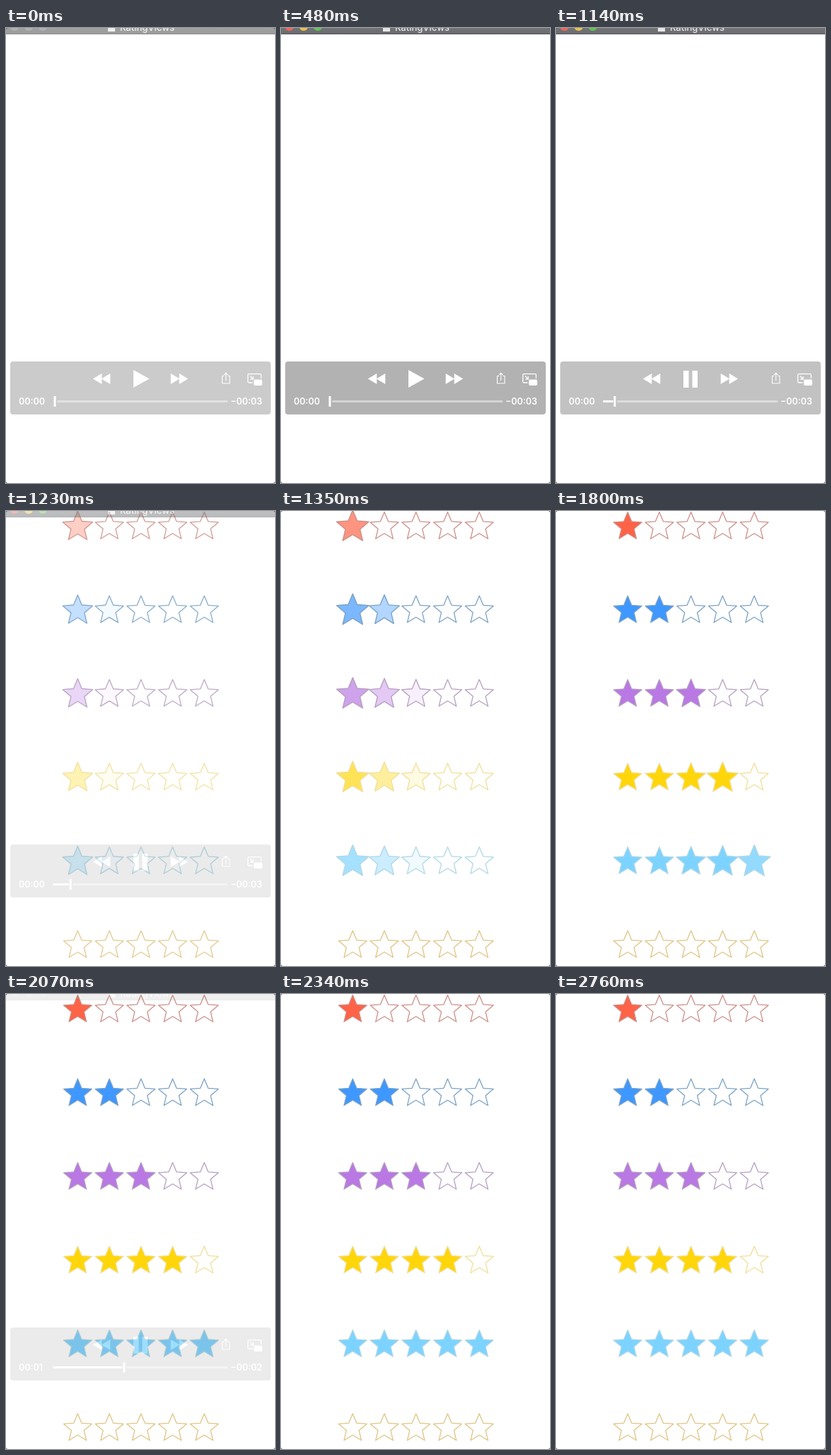
An HTML page with a canvas for the animation above (2.79 s loop, 380 by 644 pixels).

```html
<!DOCTYPE html>
<html lang="en">
<head>
<meta charset="utf-8">
<title>Star ratings</title>
<style>
  html, body { margin: 0; width: 100%; height: 100%; overflow: hidden; background: #fff; }
  canvas { display: block; }
</style>
</head>
<body>
<canvas id="stage" width="380" height="644"></canvas>
<script>
const W = 380, H = 644, LOOP = 2790, STEP = 30;
const stage = document.getElementById('stage').getContext('2d');
const layer = document.createElement('canvas');
layer.width = W;
layer.height = H;
const ui = layer.getContext('2d');

const ROWS = [
  { fill: '#ff6347', line: '#cc9088', rating: 1 },
  { fill: '#3f98ff', line: '#7ba3c6', rating: 2 },
  { fill: '#b978e4', line: '#b5a0c0', rating: 3 },
  { fill: '#ffd60a', line: '#f0df98', rating: 4 },
  { fill: '#7dd3ff', line: '#b0d8e6', rating: 5 },
  { fill: '#ffffff', line: '#dfc484', rating: 0 }
];
const LIGHTS = [[240, 102, 91], [232, 195, 75], [98, 197, 84]];
const PLAY_START = 985, STARS_START = 1095, STAR_DELAY = 100;

const clamp = v => Math.max(0, Math.min(1, v));
const ramp = (t, from, to) => clamp((t - from) / (to - from));
const ease = p => p * p * (3 - 2 * p);
const fade = (t, from, to) => ease(ramp(t, from, to));

function polygon(c, ...pts) {
  c.beginPath();
  pts.forEach(([x, y]) => c.lineTo(x, y));
  c.closePath();
}

function roundRect(c, x, y, w, h, r) {
  c.beginPath();
  c.roundRect(x, y, w, h, r);
}

function star(x, y, scale, row, amount) {
  const R = 20.9;
  const pts = Array.from({ length: 10 }, (_, i) => {
    const r = i % 2 ? R * 0.45 : R, a = i * Math.PI / 5;
    return [r * Math.sin(a), 2 - r * Math.cos(a)];
  });
  stage.save();
  stage.translate(x, y);
  stage.scale(scale, scale);
  polygon(stage, ...pts);
  if (amount > 0) {
    stage.save();
    stage.globalAlpha *= amount;
    stage.fillStyle = row.fill;
    stage.fill();
    stage.restore();
  }
  stage.lineWidth = 1.3;
  stage.lineJoin = 'round';
  stage.strokeStyle = row.line;
  stage.stroke();
  stage.restore();
}

function drawStars(t) {
  stage.globalAlpha = ramp(t, 1150, 1240);
  if (!stage.globalAlpha) return;
  ROWS.forEach((row, r) => {
    for (let i = 0; i < 5; i++) {
      const age = t - STARS_START - i * STAR_DELAY;
      const lit = i < row.rating;
      const pop = lit ? Math.sin(Math.PI * ramp(age, 0, 600)) ** 2 : 0;
      star(101.3 + i * 44.7, 20.4 + r * 118.5, 1 + 0.15 * pop, row, lit ? ramp(age, 15, 365) : 0);
    }
  });
  stage.globalAlpha = 1;
}

function drawTitle(t) {
  const active = t < 1500 ? ramp(t, 0, 480) : 0;
  const bar = ui.createLinearGradient(0, 0, 0, 9);
  bar.addColorStop(0, '#737478');
  bar.addColorStop(1, '#696a6d');
  ui.fillStyle = bar;
  ui.fillRect(0, 0, W, 9);
  ui.fillStyle = '#555659';
  ui.fillRect(0, 8, W, 1);
  LIGHTS.forEach((rgb, i) => {
    const mixed = rgb.map(v => Math.round(140 + (v - 140) * active));
    ui.fillStyle = `rgb(${mixed})`;
    ui.beginPath();
    ui.arc(12 + i * 20, -2, 6, 0, 7);
    ui.fill();
  });
  ui.fillStyle = '#e6e6e6';
  ui.fillRect(144, 0, 10, 5);
  ui.font = '500 13px Inter, sans-serif';
  ui.textAlign = 'left';
  ui.fillText('RatingViews', 161, 3.5);
}

function skipIcon(x, dir) {
  for (const tip of [x, x + dir * 12]) {
    polygon(ui, [tip, 496.5], [tip + dir * 12.5, 489], [tip + dir * 12.5, 504]);
    ui.fill();
  }
}

function shareIcon() {
  ui.lineWidth = 1.1;
  ui.beginPath();
  ui.moveTo(308, 492.5);
  ui.lineTo(305.5, 492.5);
  ui.lineTo(305.5, 503);
  ui.lineTo(316, 503);
  ui.lineTo(316, 492.5);
  ui.lineTo(313.5, 492.5);
  ui.moveTo(310.7, 499);
  ui.lineTo(310.7, 488.5);
  ui.moveTo(307.8, 491.2);
  ui.lineTo(310.7, 488.3);
  ui.lineTo(313.6, 491.2);
  ui.stroke();
}

function pipIcon() {
  ui.lineWidth = 1.3;
  ui.beginPath();
  ui.moveTo(348.5, 502);
  ui.lineTo(343, 502);
  ui.quadraticCurveTo(341.7, 502, 341.7, 500.5);
  ui.lineTo(341.7, 491);
  ui.quadraticCurveTo(341.7, 489.6, 343, 489.6);
  ui.lineTo(359, 489.6);
  ui.quadraticCurveTo(360.4, 489.6, 360.4, 491);
  ui.lineTo(360.4, 496);
  ui.moveTo(344.8, 492.5);
  ui.lineTo(349, 496.7);
  ui.moveTo(349.2, 493);
  ui.lineTo(349.2, 497);
  ui.lineTo(345.2, 497);
  ui.stroke();
  roundRect(ui, 350, 497.5, 12, 8.5, 2);
  ui.fill();
}

function drawPanel(t) {
  ui.fillStyle = 'rgba(103,103,103,.5)';
  roundRect(ui, 6, 472, 368, 75, 4);
  ui.fill();

  ui.fillStyle = ui.strokeStyle = '#fff';
  skipIcon(122.8, 1);
  skipIcon(257.2, -1);
  if (t < 930) {
    polygon(ui, [180, 484], [202.5, 496.5], [180, 509]);
    ui.fill();
  } else {
    ui.fillRect(180, 485, 7.5, 24);
    ui.fillRect(192.5, 485, 7.5, 24);
  }
  shareIcon();
  pipIcon();

  const played = Math.max(0, t - PLAY_START);
  const head = 69 + played * 0.0903;
  const elapsed = Math.floor(played / 1000);
  ui.fillRect(66.5, 527, Math.max(0, head - 69), 3);
  ui.fillRect(head - 1.5, 521, 3, 15);
  ui.fillStyle = 'rgba(255,255,255,.45)';
  roundRect(ui, head + 3, 527, 313.5 - head - 3, 3, 1.5);
  ui.fill();

  ui.fillStyle = '#fff';
  ui.font = '600 12.5px Inter, sans-serif';
  ui.textAlign = 'left';
  ui.fillText('00:0' + elapsed, 18, 533);
  ui.textAlign = 'right';
  ui.fillText('\u221200:0' + (3 - elapsed), 362, 533);
}

// Each control group is flattened first, so that it fades as a whole.
function overlay(alpha, draw, t) {
  if (alpha <= 0) return;
  ui.clearRect(0, 0, W, H);
  draw(t);
  stage.globalAlpha = alpha;
  stage.drawImage(layer, 0, 0);
  stage.globalAlpha = 1;
}

function drawCorners() {
  stage.fillStyle = '#66666a';
  stage.beginPath();
  stage.rect(0, 0, W, H);
  stage.roundRect(0, 0, W, H, 3);
  stage.fill('evenodd');
}

function render(t) {
  stage.fillStyle = '#fff';
  stage.fillRect(0, 0, W, H);
  drawStars(t);
  const appear = 0.67 + 0.33 * ramp(t, 0, 150);
  const hover = 0.36 * fade(t, 1980, 2120) * (1 - fade(t, 2120, 2330));
  overlay(appear * (1 - fade(t, 1070, 1310)) + hover, drawPanel, t);
  overlay(appear * (1 - fade(t, 1130, 1320)) + hover * 0.42, drawTitle, t);
  drawCorners();
}

const start = performance.now();
function tick() {
  const t = (performance.now() - start) % LOOP;
  render(Math.floor(t / STEP) * STEP);
  requestAnimationFrame(tick);
}
tick();
</script>
</body>
</html>
```
